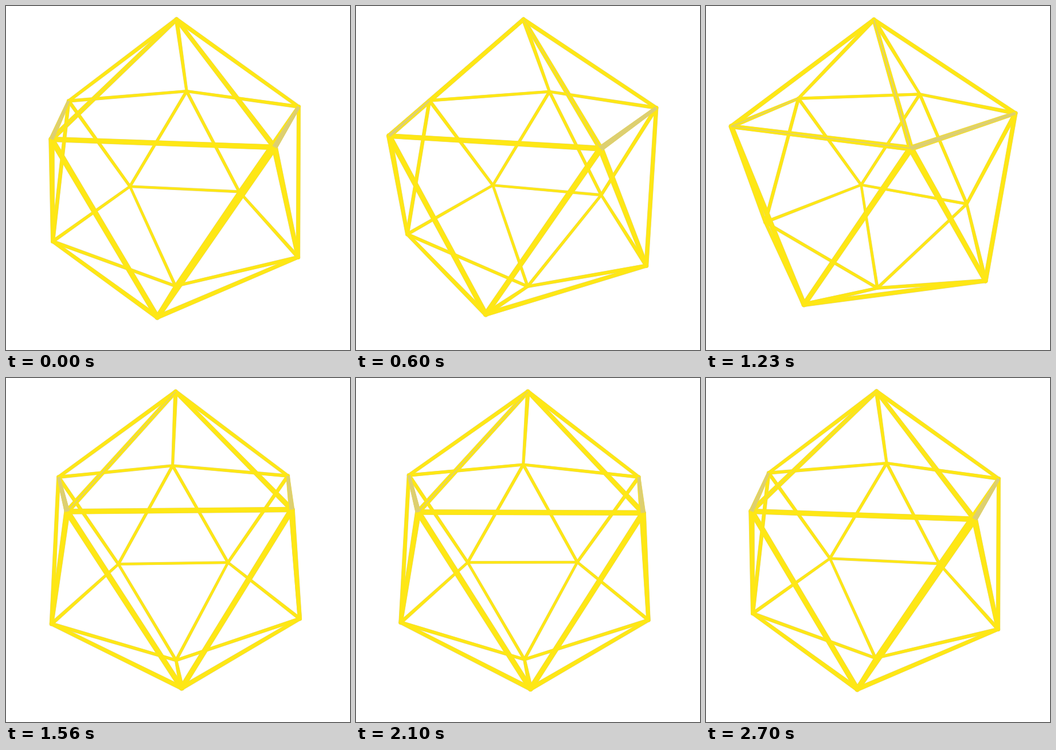
An HTML page with a canvas that plays this animation: 600x600 px, repeating every 2.73 s.

```html
<!DOCTYPE html>
<html>
<head>
<meta charset="utf-8">
<style>
  html, body { margin: 0; height: 100%; overflow: hidden; background: #fff; }
  canvas { display: block; }
</style>
</head>
<body>
<canvas id="stage" width="600" height="600"></canvas>
<script>
const ctx = document.getElementById('stage').getContext('2d');
const YELLOW = '#fee715', SHADE = '#ddcf70', RIM = '#dcd29a';
const RAD = Math.PI / 180;

// Camera: focal length, distance, pitch and offset of the view axis
const FOCAL = 593, DISTANCE = 2.425, PITCH = 22 * RAD;
const COS = Math.cos(PITCH), SIN = Math.sin(PITCH);
const SHIFT_X = -0.015, SHIFT_Y = 0.0285;
const THIN = 0.0242, THICK = 0.027;
const TILT = 0.0147, TILT_AZIMUTH = 25;  // the solid leans slightly off the spin axis
const FRAME = 30, FRAMES = 91, STEP = 4;

const wrap = a => ((a + 180) % 360 + 360) % 360 - 180;
const clamp = v => Math.max(0, Math.min(1, v));

// Share of a bar covered by its shaded side, by azimuth in degrees
const ringShade = a => clamp(1.2 - Math.abs(Math.abs(a) - 64) / 38);
const crownShade = a => clamp(0.6 - Math.abs(a + 8) / 65);

function project(radius, height, azimuth, spin) {
  let x = radius * Math.sin(azimuth * RAD), y = height, z = radius * Math.cos(azimuth * RAD);
  const lean = (TILT_AZIMUTH - spin) * RAD, ux = Math.sin(lean), uz = Math.cos(lean);
  y -= TILT * (x * ux + z * uz);
  x += TILT * height * ux;
  z += TILT * height * uz;
  const k = FOCAL / (DISTANCE - z * COS - y * SIN);
  return {
    x: 300 + k * (x + SHIFT_X),
    y: 300 - k * (y * COS - z * SIN + SHIFT_Y),
    k
  };
}

// Tapered bar with round ends, or flat ends when cap is 0
function bar(a, b, color, width, extra = 0, cap = Math.PI / 2) {
  const angle = Math.atan2(b.y - a.y, b.x - a.x), side = Math.PI / 2;
  const end = (p, from, turn) => {
    const r = p.k * width / 2 + extra;
    if (cap) return ctx.arc(p.x, p.y, r, from, from + turn);
    ctx.lineTo(p.x + r * Math.cos(from), p.y + r * Math.sin(from));
    ctx.lineTo(p.x - r * Math.cos(from), p.y - r * Math.sin(from));
  };
  ctx.fillStyle = color;
  ctx.beginPath();
  end(a, angle + side, 2 * cap);
  end(b, angle - side, 2 * cap);
  ctx.fill();
}

function solidEdges(spin) {
  const ring = (height, offset) => [0, 1, 2, 3, 4].map(i =>
    project(0.8944, height, 30.2 + offset + 72 * i - spin, spin));
  const top = project(0, 1, 0, spin), bottom = project(0, -1, 0, spin);
  const upper = ring(0.4472, 0), lower = ring(-0.4472, 36);
  return upper.flatMap((u, i) => {
    const next = (i + 1) % 5, azimuth = 30.2 + 72 * i - spin;
    return [
      [top, u, THIN, crownShade(wrap(azimuth))],
      [u, upper[next], THIN, ringShade(wrap(azimuth + 36))],
      [u, lower[i], THICK, 0],
      [upper[next], lower[i], THICK, 0],
      [lower[i], lower[next], THIN, 0],
      [lower[i], bottom, THIN, 0]
    ];
  });
}

function draw(now) {
  const spin = STEP * Math.floor(now / FRAME % FRAMES);
  const edges = solidEdges(spin);
  ctx.clearRect(0, 0, 600, 600);
  for (const [a, b, width] of edges) bar(a, b, RIM, width, 0.3);
  for (const [a, b, width] of edges) bar(a, b, YELLOW, width, -0.1);
  for (const [a, b, width, shade] of edges) if (shade) bar(a, b, SHADE, width * shade, 0, 0);
  requestAnimationFrame(draw);
}
requestAnimationFrame(draw);
</script>
</body>
</html>
```
